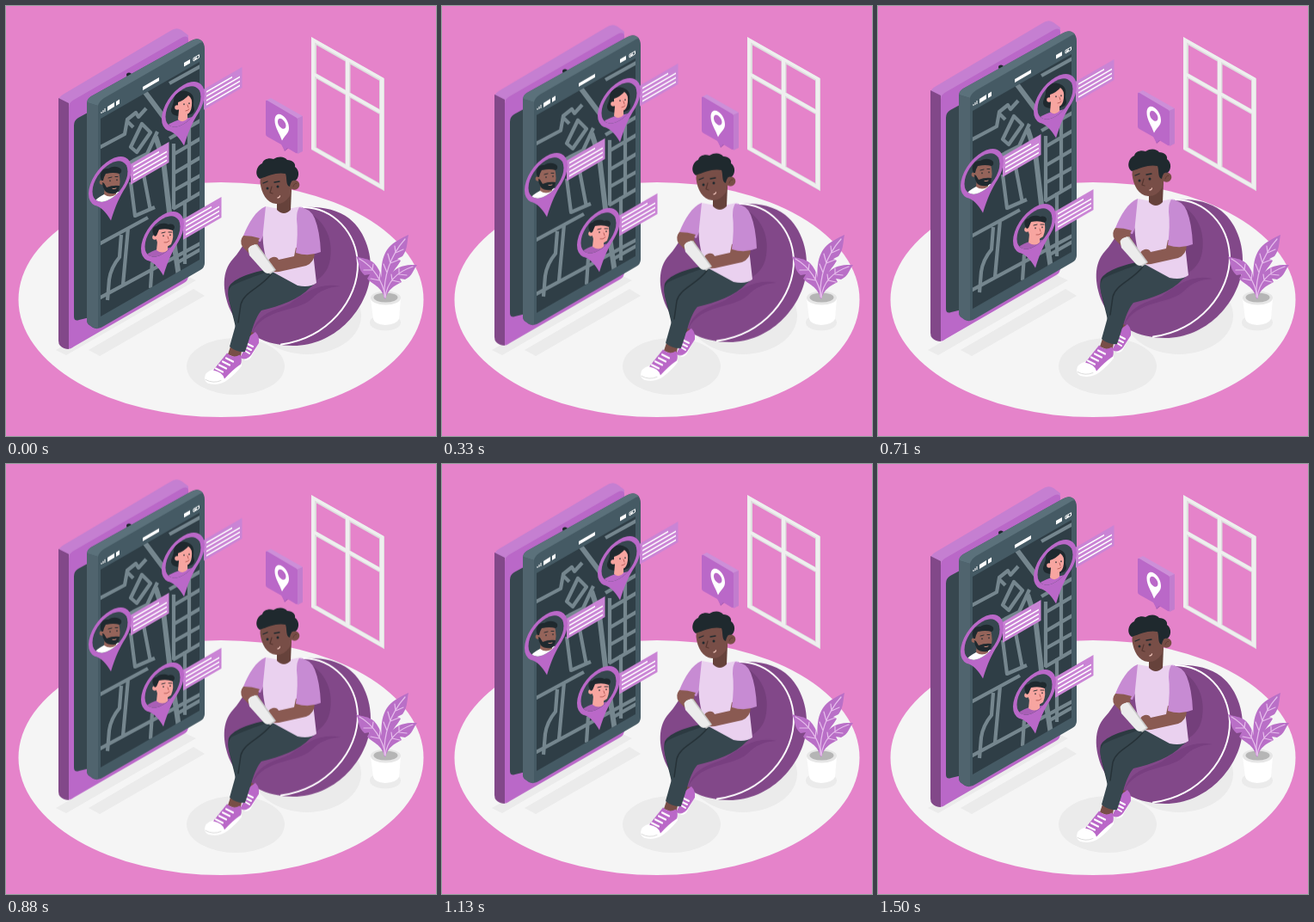
An HTML page that plays this animation: 500 by 500 pixels, repeating every 1.54 s.

```html
<!DOCTYPE html>
<html lang="en">
<head>
<meta charset="utf-8">
<title>Location sharing</title>
<style>
  html, body { margin: 0; width: 100%; height: 100%; overflow: hidden; background: #e583ca; }
  svg { display: block; width: 100vw; height: 100vh; }
  .float { animation: float 770ms -40ms ease-in-out infinite alternate; }
  @keyframes float { to { transform: translateY(-9px); } }
  .line { fill: none; stroke-linecap: round; stroke-linejoin: round; }
  .main { fill: #ba68c8; }
  .dark { fill: #824889; }
  .slate { fill: #37474f; }
  .ink { fill: #1f292e; }
  .skin { fill: #784e47; }
  .arm { fill: #8a5a52; }
  .tan { fill: #95645a; }
  .pink { fill: #f7a5a0; }
  .roads { fill: none; stroke: #75868e; stroke-width: 4.2; stroke-linejoin: round; }
</style>
</head>
<body>
<svg viewBox="0 0 500 500">
  <defs>
    <clipPath id="screen"><path d="M110 131L225 65V295L110 361Z"/></clipPath>
    <clipPath id="disc"><circle r="20.5" transform="matrix(1 -.577 0 1 0 0)"/></clipPath>
    <g id="pin" transform="matrix(1 -.577 0 1 0 0)">
      <path fill="#ca84d5" d="M24-6.500H68.500V17.500H24Z"/>
      <path stroke="#fff" stroke-width="1.800" d="M27-1.500H57M27 3.500H66M27 8.500H66M27 13.500H66"/>
      <path class="main" d="M-18 17.300A25 25 0 1 1 18 17.300C12 23 6 32 1 46C-5 32-11 23-18 17.300Z"/>
      <circle class="slate" r="20.500"/>
    </g>
  </defs>

  <rect width="500" height="500" fill="#e583ca"/>
  <ellipse cx="250" cy="341.500" rx="235.500" ry="136.500" fill="#f5f5f5"/>

  <!-- window -->
  <g transform="matrix(1 .567 0 1 355 36)" fill="none">
    <path stroke="#dedede" stroke-width="6" d="M3 3H82V128H3ZM42.500 3V128M3 42H82"/>
    <path stroke="#efefef" stroke-width="4" d="M2 2H82V128H2ZM42 2V128M2 41.500H82"/>
  </g>

  <!-- ground shadows -->
  <g fill="#ebebeb">
    <path d="M58 400L208 313L221 319L70 406Z"/>
    <path d="M96 400L218 329L231 337L109 407Z"/>
    <ellipse cx="350" cy="360" rx="63" ry="45"/>
    <ellipse cx="267" cy="419" rx="57" ry="33"/>
    <ellipse cx="441" cy="368" rx="18" ry="9.500"/>
  </g>

  <g class="float">
    <!-- phone back -->
    <path fill="#c57fd1" d="M61 111Q61 106 66 103L191 29Q198 24 204 28L212 34V60L73 116Z"/>
    <path class="dark" d="M61 107L73 113V399Q67 399 63 395Q61 393 61 389Z"/>
    <path class="main" d="M73 118Q73 112 79 109L204 37Q212 33 212 40V314Q212 319 207 322L79 396Q73 400 73 398Z"/>
    <path class="slate" d="M79 139Q79 133 84 130L106 118V360L85 365Q79 367 79 361Z"/>
    <ellipse class="ink" cx="143" cy="80" rx="3" ry="2.500"/>

    <!-- phone front -->
    <path fill="#455a64" d="M94 114Q94 108 99 105L214 41Q222 36 227 40Q231 43 231 50V299Q231 304 226 307L114 372Q107 377 101 374L97 371Q94 369 94 365Z"/>
    <path fill="#5b717b" d="M94 112Q95 107 99 105L214 41Q222 36 227 40L229 42Q226 42 222 45L114 107Q108 111 107 116Z"/>
    <path fill="#50646e" d="M94 112L107 116V375Q103 375 97 371Q94 369 94 365Z"/>
    <path fill="#2f3e46" d="M110 131L225 65V295L110 361Z"/>
    <g clip-path="url(#screen)" class="roads">
      <path d="M108 165L138 149L141 132L151 124L154 129L163 119M141 134L148 141M145 164L158 137L168 147L152 170ZM108 203L148 180L164 172L176 146"/>
      <path d="M145 205L150 244L173 234M160 196L168 238M134 266L132 292Q122 304 120 318L118 342M108 277L165 246M142 258L136 324M108 340L228 275M170 298L168 328"/>
      <path d="M195 160V236M213 134V225M190 154L228 132M194 173L228 153M194 195L228 175M194 215L228 196M194 236L228 216M208 226V300M198 299L228 282"/>
      <path stroke-width="6" d="M160 98L187 134M174 152L183 180L190 240L201 314"/>
      <path d="M190 90L228 69"/>
    </g>
    <g fill="#fff">
      <path d="M159 94L178 83V87L159 98ZM118 117L126 112V117L118 122ZM128 111L132 108.500V113.500L128 116ZM207 66L214 62V66.500L207 70.500Z"/>
      <path fill="none" stroke="#fff" d="M111 125V123M113 124V121M115 123V119M218 60.500L224.500 56.700V60L218 64Z"/>
      <path d="M219 61L222 59.300V61L219 62.700Z"/>
    </g>

    <!-- people on the map -->
    <g transform="translate(206 117)">
      <use href="#pin"/>
      <g clip-path="url(#disc)">
        <path class="ink" d="M-12 9C-17 4-11-1-11-8C-10-17-1-21 6-17C12-15 13-9 12-3C12 2 15 4 11 8C2 13-6 12-12 9Z"/>
        <path class="main" d="M-25 29L-16 20Q-5 14 7 13L17 10L20 30Z"/>
        <path class="pink" d="M-5 4L5 6V14Q0 20-6 15Z"/>
        <path class="pink" d="M-6-5Q2-8 6-13Q11-10 10-1Q9 8 4 9Q-4 8-6 2Z"/>
        <circle class="pink" cx="-7" cy="1" r="2.800"/>
        <path class="line" stroke="#1f292e" stroke-width="1.300" d="M1-3V-2.500M7-4V-3.500"/>
        <path class="line" stroke="#b9605c" d="M3 5Q5 5 7 3M5-2L6 1"/>
      </g>
    </g>
    <g transform="translate(121 204)">
      <use href="#pin"/>
      <g clip-path="url(#disc)">
        <path fill="#fff" d="M-24 30L-15 20Q-7 14 1 12L13 12L20 30Z"/>
        <path class="tan" d="M-6 5L7 7V15Q0 20-7 15Z"/>
        <path class="tan" d="M-9-9L10-11Q13 0 10 9Q4 14-3 12Q-9 7-9-9Z"/>
        <circle class="tan" cx="-9.500" cy="1" r="2.800"/>
        <path class="ink" d="M-10-1C-14-10-8-16-2-15C4-19 11-17 13-14Q14-10 11-9Q4-11-5-9Q-7-6-8-1Z"/>
        <path class="ink" d="M-9 1L-7 2L-4 7Q3 4 11 5Q11 12 6 14Q-2 15-6 11Q-9 6-9 1Z"/>
        <path class="line" stroke="#1f292e" stroke-width="1.300" d="M0-1V-.5M8-2V-1.500"/>
        <path class="line" stroke="#1f292e" stroke-width=".9" d="M-2-4L2-5M6-5.500L9-5.500"/>
        <path class="line" stroke="#c58a7c" d="M3 8.500Q5 9 7 8"/>
      </g>
    </g>
    <g transform="translate(182 268)">
      <use href="#pin"/>
      <g clip-path="url(#disc)">
        <path fill="#a95fb6" d="M-24 31L-17 20Q-8 14 2 14L14 12L20 32Z"/>
        <path class="pink" d="M-6 6L6 7V16Q0 21-7 16Z"/>
        <path class="pink" d="M-8-9L11-11Q14 0 10 9Q3 15-4 11Q-8 6-8-9Z"/>
        <circle class="pink" cx="-9" cy="1" r="2.800"/>
        <path class="ink" d="M-9 0C-14-7-11-12-7-12C-4-16 3-16 7-14C14-16 16-10 12-7Q5-10-4-8L-7-1Z"/>
        <path class="line" stroke="#1f292e" stroke-width="1.300" d="M1-1V-.5M9-2V-1.500"/>
        <path class="line" stroke="#1f292e" stroke-width=".9" d="M-1-4L3-5M7-5L11-5"/>
        <path class="line" stroke="#b9605c" d="M2 7Q5 8 8 5M6 0L7 3"/>
      </g>
    </g>

    <!-- location bubble -->
    <path fill="#cd8fd8" d="M302 110L308 107L345 128L339 132Z"/>
    <path fill="#c27dce" d="M338 131L345 128V169L339 172Z"/>
    <path fill="#a359b0" d="M321 161L332 160V162L324 169Z"/>
    <path class="main" d="M302 111Q302 109 304 110L338 130Q339 131 339 133V170Q339 172 337 171L327 165L324 168L320 161L304 152Q302 151 302 149Z"/>
    <path fill="#fff" fill-rule="evenodd" d="M321 156.500C318 148 312.500 141 312.500 133C312.500 126 317 124.500 321 127C326 130 329 136 329 142C329 148 325 149 321 156.500ZM321 131.500C318 129.500 316 131.500 316 134.500C316 138 318.500 141 321 142.500C324 143.500 325.500 142 325.500 139C325.500 136 323 133 321 131.500Z"/>

    <!-- bean bag -->
    <path class="dark" d="M325 238C345 231 380 232 399 247C419 263 427 292 423 318C417 355 382 395 334 395C304 395 274 382 261 354C251 331 251 308 264 294C276 281 280 268 286 260Z"/>
    <path fill="#743f7b" d="M344 237C369 245 381 269 377 294C375 309 366 318 350 325L300 310L330 250Z"/>
    <path fill="#783f80" d="M389 326C365 321 348 333 330 346C312 355 294 355 286 380C301 350 339 356 355 341C365 331 374 327 389 326Z"/>
    <path class="line" stroke="#fff" stroke-width="2" d="M346 234C381 235 407 263 409 299C410 342 374 386 320 393.500"/>

    <!-- shoes -->
    <path class="skin" d="M275 375L288 380L284 396L272 392Z"/>
    <path fill="#fff" d="M272 406L278 412Q284 412 286 406L294 392L291 386Z"/>
    <path class="main" d="M283 384L290 379Q295 384 294 392L285 406Q279 413 272 409L279 396Z"/>
    <path class="line" stroke="#fff" stroke-width="2" d="M281 393L287 396M279 397L285 400M278 401L283 404"/>
    <path class="skin" d="M262 393L275 397L272 411L258 405Z"/>
    <g transform="translate(0 1.500)">
      <path fill="#fff" d="M231 431Q231 424 241 421L273 412L274 417Q268 425 258 433Q249 440 238 438Q231 437 231 431Z"/>
      <path class="main" d="M241 422L257 402Q264 409 272 404Q275 409 273 415Q264 421 254 432Q252 424 241 422Z"/>
      <path class="line" stroke="#fff" stroke-width="2.200" d="M256 408L264 412M252 412L260 416M248 416L256 420M244 420L252 424"/>
      <path class="line" stroke="#d2d2d2" stroke-width=".8" d="M232 433Q241 438 250 434"/>
    </g>

    <!-- legs -->
    <path fill="#2c3a41" d="M312 305C290 308 264 316 259 327C256 338 264 356 268 379L284 384L291 350L340 330Z"/>
    <path class="slate" d="M352 319L310 307C296 312 272 320 262 326C256 332 259 342 262 350L267 371L260 396Q268 403 278 402C284 386 288 364 297 354C318 349 341 341 354 327Q361 322 360 319Z"/>
    <path class="line" stroke="#263238" stroke-width="1.500" d="M308 312C296 328 277 332 273 347L270 368"/>

    <!-- torso and arms -->
    <path fill="#c78bd3" d="M302 233C291 237 282 252 276 267Q283 274 296 274L307 248Z"/>
    <path class="arm" d="M276 267Q271 273 275 280L291 296L302 292L292 275L295 270Q286 267 276 267Z"/>
    <path fill="#ead1ef" d="M302 233Q323 238 343 233Q353 240 354 260L361 322Q353 328 339 325L306 307Q297 278 299 262Z"/>
    <path class="arm" d="M337 281L359 286Q359 298 349 302L322 308Q308 312 303 304Q303 294 310 292Q315 291 317 295L335 291Z"/>
    <path fill="#c78bd3" d="M341 234Q354 235 359 247Q365 262 366 286Q352 292 337 287Q340 264 338 248Q338 238 341 234Z"/>
    <path fill="#c9c9c9" d="M283 280L292 277L314 307L307 312Z"/>
    <path fill="#ececec" d="M281 280L290 277L312 307L305 311Q302 311 300 309L283 290Z"/>
    <path class="arm" d="M276 273Q283 267 294 273L293 276Q284 277 281 283Z"/>

    <!-- head -->
    <path fill="#66423b" d="M315 224L332 213L331 237Q323 245 315 237Z"/>
    <path class="skin" d="M296 194L331 194Q335 209 330 221Q323 231 314 230C303 229 297 218 295.500 205Z"/>
    <circle class="skin" cx="335.500" cy="208" r="5.800"/>
    <path class="ink" d="M295 201C288 196 292 185 298 183C299 178 306 176 311 178C317 174 324 175 327 179C333 179 337 183 336 187C342 191 341 201 336 203C332 202 331 206 330 210C325 209 327 200 325 195C315 193 306 197 295 201Z"/>
    <path class="line" stroke="#1f292e" stroke-width="1.300" d="M299 206L304 204M312 205L318 204"/>
    <g class="ink"><circle cx="304" cy="212" r="1.500"/><circle cx="316" cy="210" r="1.500"/></g>
    <path class="line" stroke="#553630" stroke-width="1.200" d="M309 210L307 217L310 218"/>
    <path class="line" stroke="#ecc1b7" stroke-width="1.300" d="M316 223Q318 223 318.500 221"/>
    <path class="line" stroke="#5f3d35" d="M334 210Q335 206 338 206"/>
  </g>

  <!-- plant -->
  <path fill="#fff" d="M424 340H459L457 364Q454 370 441 371Q429 370 427 364Z"/>
  <ellipse cx="441.500" cy="339.500" rx="17.500" ry="8" fill="#e6e6e6"/>
  <ellipse cx="441.500" cy="339" rx="14" ry="5.500" fill="#b5b5b5"/>
  <g fill="#b96fc7">
    <path d="M440 340C436 320 433 295 445 281C451 274 460 270 468 266C466 276 467 283 461 291L455 294L459 296C454 306 444 310 441 340Z"/>
    <path d="M441 341C438 326 441 315 451 308C459 301 468 301 478 301C473 307 473 314 464 318L458 317L460 321C451 326 444 329 441 341Z"/>
    <path d="M441 341C440 325 437 308 428 299C421 293 415 294 407 291C411 298 409 307 417 313L423 312L420 317C426 324 436 325 441 341Z"/>
  </g>
  <g class="line" stroke="#e6bdec" stroke-width="1.200">
    <path d="M440 338C439 316 446 291 464 271M443 310L439 300M447 299L444 288M447 299L457 295M453 287L452 279M453 287L462 283"/>
    <path d="M441 339C443 321 455 309 473 303M449 319L448 312M449 319L458 321M457 312L457 305M457 312L466 313"/>
    <path d="M441 339C439 321 427 303 411 294M434 319L435 310M434 319L424 317M426 307L427 300M426 307L416 307"/>
  </g>
</svg>
</body>
</html>
```
